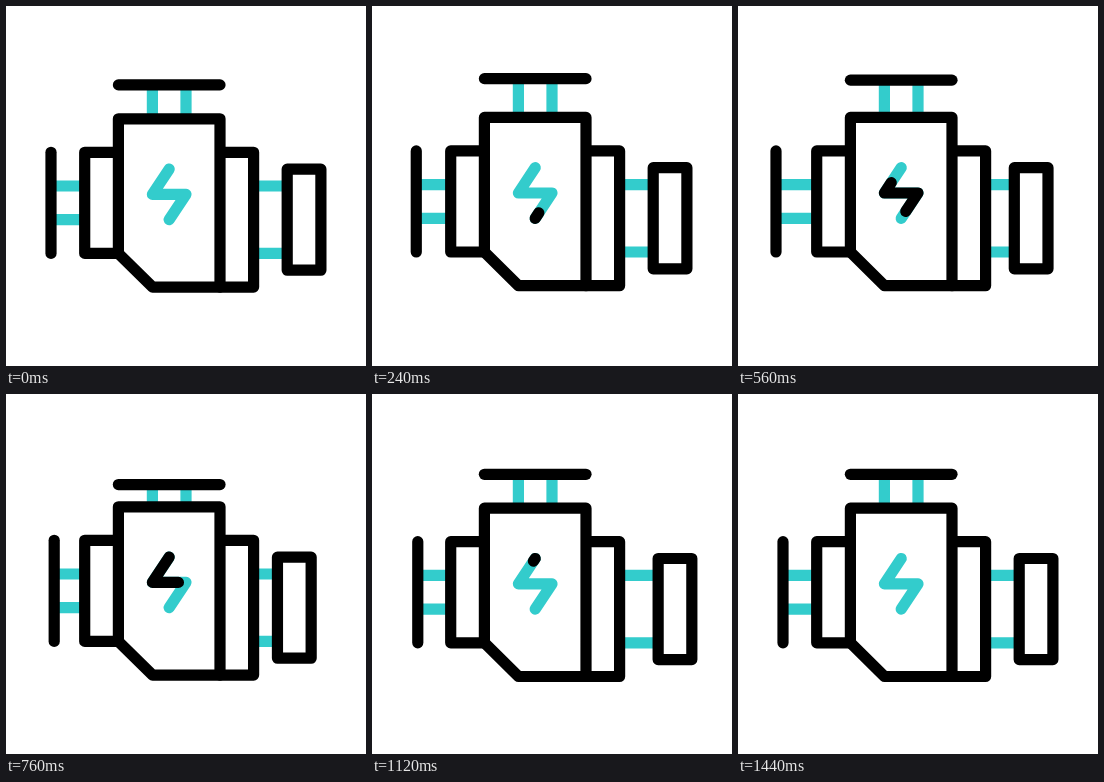
Animation, 360 px wide and 360 px high, one loop 1480 ms. Source, as an HTML page:

```html
<!DOCTYPE html>
<html lang="en">
<head>
<meta charset="utf-8">
<title>Engine</title>
<style>
  html, body { margin: 0; width: 100%; height: 100%; overflow: hidden; background: #fff; }
  svg { display: block; width: 100vw; height: 100vh; }
  path { fill: none; stroke-width: 11.2; stroke-linecap: round; stroke-linejoin: round; }
  .ink { stroke: #000; }
  .solid { fill: #fff; }
  .teal { stroke: #33cccc; }
  .stem { stroke-linecap: butt; }
</style>
</head>
<body>
<svg viewBox="0 0 360 360">
  <g id="engine">
    <path id="stems" class="teal stem"/>
    <path id="topBar" class="ink" d="M112.4 78.9H214"/>
    <path id="leftBar" class="ink" d="M45 146.3V247.4"/>
    <path id="rightBox" class="ink solid" d="M281.2 163.1H314.9V264.2H281.2Z"/>
    <path class="ink solid" d="M112.4 146.3H78.7V247.4H112.4"/>
    <path class="ink solid" d="M214 146.3H247.6V281.1H214"/>
    <path class="ink solid" d="M112.4 112.8H214V281.1H146.5L112.4 247.4Z"/>
    <path class="teal" d="M163.2 213.7L180 188.4H146.4L163.2 163.1"/>
    <path id="spark" class="ink" d="M163.2 213.7L180 188.4H146.4L163.2 163.1"/>
  </g>
</svg>
<script>
const STEP = 40, COUNT = 37, SHAKE = 1.4;
const el = id => document.getElementById(id);
const engine = el('engine'), stems = el('stems'), topBar = el('topBar');
const leftBar = el('leftBar'), rightBox = el('rightBox'), spark = el('spark');
const sparkLength = spark.getTotalLength();

// Keys are [step, value] pairs, eased in and out between neighbours.
const topKeys = [[0.5, 0], [11.7, -10], [18, 12], [27.5, 0]];
const leftKeys = [[4, 0], [14, -7], [23, 10.5], [29, 0]];
const rightKeys = [[8.5, 0], [19.5, -9.8], [27.5, 5], [35, 0]];
const headKeys = [[3.7, 0], [18, 1]];
const tailKeys = [[10.4, 0], [30.2, 1]];

function valueAt(keys, k) {
  if (k <= keys[0][0]) return keys[0][1];
  for (let i = 1; i < keys.length; i++) {
    const [a, from] = keys[i - 1], [b, to] = keys[i];
    if (k < b) {
      const u = (k - a) / (b - a);
      return from + (to - from) * u * u * (3 - 2 * u);
    }
  }
  return keys[keys.length - 1][1];
}

// The shake starts from rest, then swings up and down every four steps.
function shakeAt(k) {
  return k < 2 ? -SHAKE * k / 2 : SHAKE * Math.cos(k * Math.PI / 2);
}

function move(node, x, y) {
  node.setAttribute('transform', `translate(${x.toFixed(2)} ${y.toFixed(2)})`);
}

function draw(k) {
  const top = valueAt(topKeys, k);
  const left = valueAt(leftKeys, k);
  const right = valueAt(rightKeys, k);
  move(engine, 0, shakeAt(k));
  move(topBar, 0, top);
  move(leftBar, left, 0);
  move(rightBox, right, 0);

  const y = 78.9 + top, x1 = 45 + left, x2 = 281.2 + right;
  stems.setAttribute('d',
    `M146.4 ${y}V113M180 ${y}V113` +
    `M${x1} 180H79M${x1} 213.7H79` +
    `M248 180H${x2}M248 247.4H${x2}`);

  const head = valueAt(headKeys, k) * sparkLength;
  const tail = valueAt(tailKeys, k) * sparkLength;
  const shown = head - tail;
  spark.style.display = shown > 0.01 ? '' : 'none';
  spark.setAttribute('stroke-dasharray', `${shown} ${sparkLength * 2}`);
  spark.setAttribute('stroke-dashoffset', -tail);
}

const start = performance.now();
function tick() {
  const elapsed = Math.max(0, performance.now() - start);
  draw(Math.floor(elapsed / STEP) % COUNT);
  requestAnimationFrame(tick);
}
tick();
</script>
</body>
</html>
```
